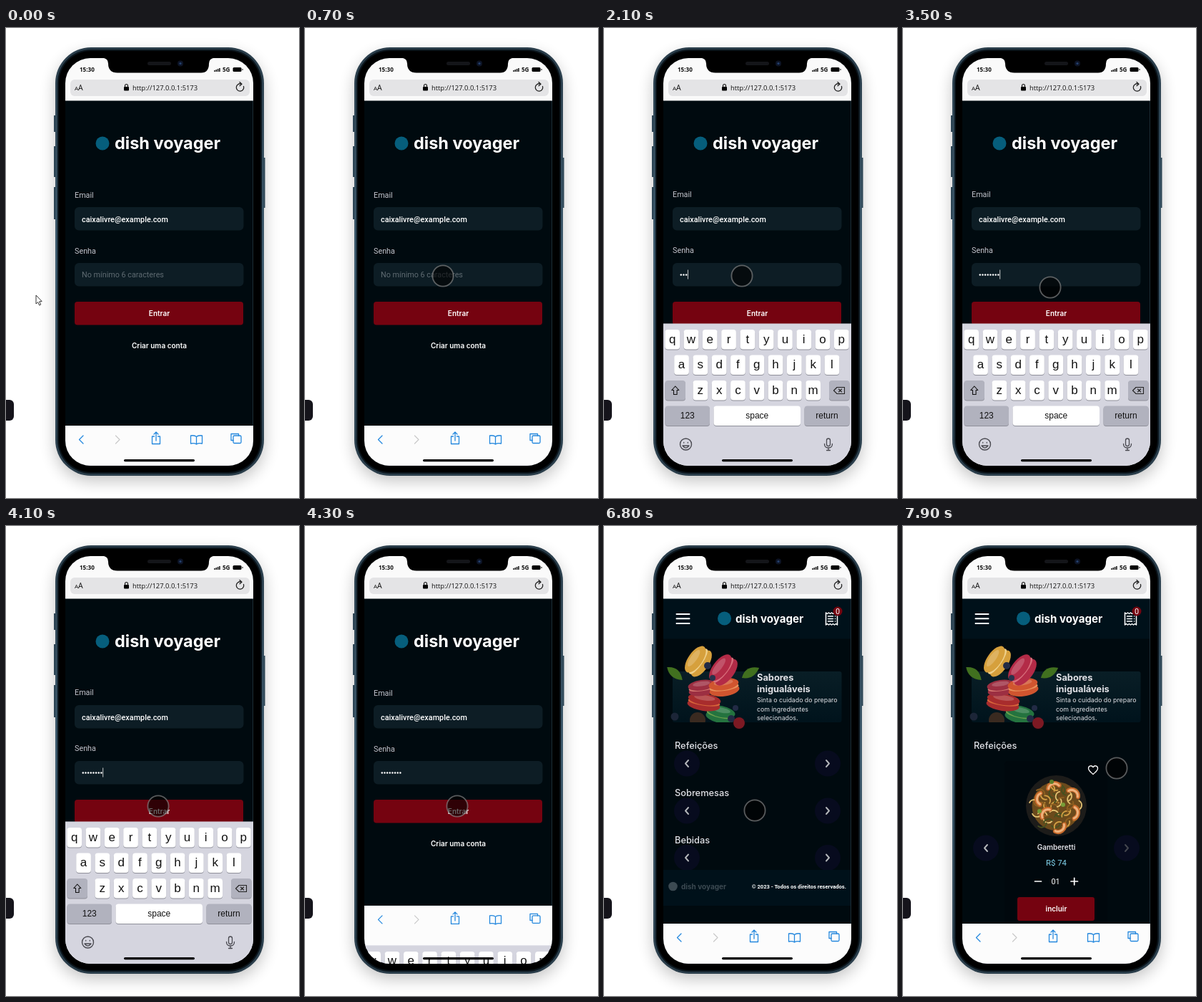
Animation, 410 px wide and 656 px high, one loop 8000 ms. Source, as an HTML page:

```html
<!DOCTYPE html>
<html lang="pt-BR">
<head>
<meta charset="utf-8">
<title>Login</title>
<style>
html, body { margin: 0; width: 100%; height: 100%; overflow: hidden; background: #fff }
svg { display: block; width: 100vw; height: 100vh }
text { font-family: Inter, sans-serif; fill: #fff }
.mid { text-anchor: middle }
.strong { font-size: 10px; font-weight: 600; text-anchor: middle }
.rob { font-family: Roboto, sans-serif; font-size: 10.8px }
.open { font-family: "Open Sans", sans-serif; fill: #111 }
.key text { font: 17px "Liberation Sans", Arial, sans-serif; fill: #111; text-anchor: middle }
.key .small { font-size: 12px }
.line { fill: none; stroke-width: 1.3; stroke-linecap: round; stroke-linejoin: round }
.brand { font-weight: 700 }
.head { font-size: 12.8px; font-weight: 500; fill: #e1e1e6 }
</style>
</head>
<body>
<svg viewBox="0 0 410 656">
  <defs>
    <filter id="soft" x="-20%" y="-20%" width="140%" height="140%"><feGaussianBlur stdDeviation="11"/></filter>
    <linearGradient id="steel" x2="0" y2="1">
      <stop stop-color="#2a3d4a"/><stop offset=".5" stop-color="#3d5a6d"/><stop offset="1" stop-color="#2a3d4a"/>
    </linearGradient>
    <linearGradient id="promo" x2="0" y2="1"><stop stop-color="#091e26"/><stop offset="1" stop-color="#00131c"/></linearGradient>
    <clipPath id="screen"><rect x="83" y="42" width="263" height="569" rx="35"/></clipPath>
    <clipPath id="art"><rect x="83" y="157" width="150" height="117"/></clipPath>
    <clipPath id="plate"><circle cx="214.500" cy="390.500" r="42.500"/></clipPath>
  </defs>

  <rect x="-10" y="519" width="21" height="29" rx="6" fill="#15141b"/>
  <rect x="69" y="36" width="292" height="596" rx="50" opacity=".24" filter="url(#soft)"/>
  <path d="M68.500 122v23M68.500 165v43M68.500 222v45M361 181v70" stroke="#2c4454" stroke-width="3"/>
  <rect x="69" y="27" width="292" height="598" rx="50" fill="url(#steel)"/>
  <rect x="72" y="30" width="286" height="592" rx="47" fill="#0b151c"/>
  <rect x="74" y="32" width="282" height="588" rx="45"/>

  <g clip-path="url(#screen)">
    <rect x="83" y="41" width="263" height="570" fill="#000a0f"/>
    <g id="login"></g>
    <g id="home"></g>
    <path d="M345.500 101v510" stroke="#26363f" stroke-width=".8"/>

    <rect x="83" y="41" width="263" height="60.500" fill="#fafafa"/>
    <rect x="90" y="72" width="251" height="23" rx="6" fill="#e4e4e6"/>
    <text class="open" x="103" y="60.500" font-size="8.100" font-weight="700">15:30</text>
    <text class="open" x="303" y="61" font-size="8.100" font-weight="700">5G</text>
    <path d="M292 61v-2M294.300 61v-3M296.600 61v-4M298.900 61v-5" stroke="#111" stroke-width="1.500"/>
    <rect x="317.500" y="55" width="12" height="6" rx="1.500"/><path d="M331 57v2" stroke="#111"/>
    <text class="open" x="96" y="87" font-size="8">A</text>
    <text class="open" x="101" y="87" font-size="10.500">A</text>
    <rect x="165" y="82" width="7" height="5.500" rx="1"/>
    <path d="M166.500 82v-1.500a2 2 0 0 1 4 0V82" fill="none" stroke="#111" stroke-width="1.100"/>
    <text class="open" x="177" y="87" font-size="9.400">http://127.0.0.1:5173</text>
    <path class="line" d="M332.500 81.500a5.200 5.200 0 1 1-3.500-3.500M327 75.500l3 2.700-3 2.500" stroke="#222"/>

    <g id="bar">
      <rect x="83" width="263" height="60" fill="#fcfcfc"/>
      <g class="line" stroke="#2387dd">
        <path d="M108 14l-5.500 5.500 5.500 5.500"/>
        <path d="M153.500 14l5.500 5.500-5.500 5.500" stroke="#ccc"/>
        <path d="M207.500 15h-3v10.500h11V15h-3M210 21V9.500M207 12l3-3 3 3"/>
        <path d="M266.500 15.500c-2-2-5-2-8-1.500v11c3-.5 6-.5 8 1c2-1.500 5-1.500 8-1V14c-3-.5-6-.5-8 1.500v10"/>
        <path d="M318 20.500h-3v-9h10.500V14"/><rect x="318" y="14" width="11" height="10.500" rx="1.500"/>
      </g>
    </g>
    <g id="keys" class="key"></g>
    <rect x="165" y="602" width="99" height="3.200" rx="1.600"/>
  </g>

  <path d="M135 41.500q8 1 8 8q0 13 13 13h117q11 0 11-13q0-7 8-8z"/>
  <rect x="198" y="47" width="33" height="5" rx="2.500" fill="#141519"/>
  <circle cx="244" cy="49.500" r="4" fill="#0d1426"/><circle cx="244" cy="49.500" r="1.600" fill="#24406e"/>

  <path id="arrow" d="M0 0v12l2.700-2.400 2 4.400 2-.9-2-4.300 3.500-.3z" fill="#fff" stroke="#222" stroke-width=".9"/>
  <circle id="touch" r="14.600" fill="#000" fill-opacity=".6" stroke="#888" stroke-opacity=".65" stroke-width="1.800"/>
</svg>
<script>
const $ = id => document.getElementById(id);
const BRAND = 'dish voyager', TEAL = '#065e7c', RED = '#750310';

const text = (x, y, s, attrs = '') => `<text x="${x}" y="${y}" ${attrs}>${s}</text>`;
const rect = (x, y, w, h, r, fill) => `<rect x="${x}" y="${y}" width="${w}" height="${h}" rx="${r}" fill="${fill}"/>`;
const dot = (x, y, r, fill) => `<circle cx="${x}" cy="${y}" r="${r}" fill="${fill}"/>`;
const oval = (y, rx, ry, fill) => `<ellipse cy="${y}" rx="${rx}" ry="${ry}" fill="${fill}"/>`;
const line = (d, color = '#fff', w = 1.3) => `<path class="line" d="${d}" stroke="${color}" style="stroke-width:${w}"/>`;

// Login page
$('login').innerHTML =
  dot(135, 161, 9.5, TEAL) + text(152, 169, BRAND, 'class="brand" font-size="23.5"') +
  `<g id="labels">${text(96, 237, 'Email', 'class="rob" style="fill:#c4c4cc"')}
   ${text(96, 315, 'Senha', 'class="rob" style="fill:#c4c4cc"')}</g>` +
  rect(96, 250, 236.5, 32.5, 6, '#0d1d25') + rect(96, 328, 236.5, 32.5, 6, '#0d1d25') +
  text(106, 271, 'caixalivre@example.com', 'class="rob" font-weight="500"') +
  text(106, 348, 'No mínimo 6 caracteres', 'id="hint" class="rob" style="fill:#5f6b72"') +
  `<g id="dots">${Array.from({ length: 8 }, (_, i) => dot(107.8 + 3.65 * i, 344.5, 1.25, '#fff')).join('')}</g>` +
  '<path id="caret" d="M106.500 337.500v13" stroke="#ddd" stroke-width=".9"/>' +
  rect(96, 382, 236, 32.5, 4, RED) +
  text(214.5, 401.5, 'Entrar', 'class="strong"') +
  text(214.5, 446.5, 'Criar uma conta', 'class="strong"');

// Home page
const macaron = (x, y, w, h, turn, shell, cream) =>
  `<g transform="translate(${x} ${y}) rotate(${turn})">` +
  oval(h * .17, w / 2, h * .33, shell) + oval(0, w * .49, h * .2, cream) +
  oval(-h * .17, w / 2, h * .33, shell) + oval(-h * .26, w * .32, h * .15, '#ffffff30') + '</g>';
const leaf = (x, y, turn) =>
  `<path transform="translate(${x} ${y}) rotate(${turn})" d="M-14 0q13-13 28 0q-15 11-28 0" fill="#41701f"/>`;
const chevron = (x, y, s, color) =>
  dot(x, y, 18, '#070b1e') + line(`M${x - 2 * s} ${y - 4.5}l${4 * s} 4.500l${-4 * s} 4.500`, color, 1.9);
const arrows = (y, right = '#b5b8bb') => chevron(116, y, -1, '#b5b8bb') + chevron(313, y, 1, right);
const arc = (x, y, r, turn, color, w) =>
  `<path transform="translate(${x} ${y}) rotate(${turn})" d="M${-r} 0a${r} ${r} 0 0 1 ${1.6 * r} ${-.8 * r}"
   fill="none" stroke="${color}" stroke-width="${w}" stroke-linecap="round"/>`;

const banner =
  rect(96, 203, 236.5, 71, 3, 'url(#promo)') +
  '<g clip-path="url(#art)">' + leaf(99, 206, 40) + leaf(205, 205, -30) +
  dot(131, 271, 11, '#3a2a20') + dot(99, 266, 5.5, '#1c2537') +
  macaron(163, 263, 40, 24, 12, '#24733f', '#6ea04c') +
  macaron(140, 246, 46, 24, 8, '#a82c2d', '#d7653a') +
  macaron(137, 226, 38, 22, -8, '#9c2f42', '#d77a72') +
  macaron(168, 225, 42, 25, -8, '#d0552f', '#e9925b') +
  macaron(167, 201, 44, 31, -52, '#b32b47', '#d86f7c') +
  macaron(132, 189, 43, 30, -55, '#d6a03c', '#efd08a') +
  dot(145, 195, 5, '#222b45') + dot(152, 212, 4, '#29324b') + dot(184, 254, 4, '#222b45') + dot(178, 269, 5, '#222b45') +
  '</g>' + dot(189, 275, 8, '#7d1923') +
  ['Sabores', 'inigualáveis'].map((s, i) =>
    text(214, 216 + 16.3 * i, s, 'font-size="12.8" font-weight="700" style="fill:#e1e1e6"')).join('') +
  ['Sinta o cuidado do preparo', 'com ingredientes', 'selecionados.'].map((s, i) =>
    text(214, 246 + 12.5 * i, s, 'font-size="8.8" style="fill:#e1e1e6"')).join('');

const header =
  rect(83, 101, 263, 56.5, 0, '#00111a') + line('M101.500 123h18M101.500 129.300h18M101.500 136h18', '#fff', 2) +
  dot(168.5, 129, 9.5, TEAL) + text(184, 134.5, BRAND, 'class="brand" font-size="15.1"') +
  line('M310.500 121v17l2-1.500 2 1.500 2-1.500 2 1.500 2-1.500 2 1.500 2-1.500 2 1.500v-17l-2 1.500-2-1.500-2 1.500-2-1.500-2 1.500-2-1.500-2 1.500z' +
    'M313.500 126h7M313.500 129.500h7M313.500 133h7M323.500 126h.1M323.500 129.500h.1M323.500 133h.1', '#fff', 1.5) +
  dot(327, 119, 6.5, RED) + text(327, 123, '0', 'class="rob mid"');

const empty =
  [331.5, 397.5, 463].map(y => arrows(y)).join('') +
  ['Sobremesas', 'Bebidas'].map((s, i) => text(99, 377 + 66 * i, s, 'class="head"')).join('') +
  rect(83, 480, 263, 50, 0, '#00111a') + dot(96.5, 503, 6.3, '#3c4a52') +
  text(108, 507, BRAND, 'class="brand" font-size="10" style="fill:#3c4a52"') +
  text(339, 506, '© 2023 - Todos os direitos reservados.', 'text-anchor="end" class="rob" style="font-size:7.6px" font-weight="700"');

const noodles = Array.from({ length: 40 }, (_, i) => {
  const a = i * 2.4, d = 5 * Math.sqrt(i);
  return arc(214 + d * Math.cos(a), 392 + d * Math.sin(a), 7, i * 67, ['#d3a044', '#8f5f20', '#e4c272', '#46501f'][i % 4], 1.8);
}).join('');
const prawns = [[196, 381, -60], [212, 368, 10], [236, 377, 60], [236, 400, 120], [203, 404, -20], [217, 418, 170]]
  .map(([x, y, turn]) => arc(x, y, 9, turn, '#c96a2b', 6) + arc(x, y, 8.5, turn, '#eeb27c', 3)).join('');
const card =
  rect(142, 328, 144, 240, 5, '#00080d') +
  line('M266 346.500c-3-2.800-6.500-5-6.500-8.300c0-3.800 4.700-4.700 6.500-1.400c1.800-3.300 6.500-2.400 6.500 1.400c0 3.300-3.500 5.500-6.500 8.300z') +
  '<g clip-path="url(#plate)">' + dot(214.5, 390.5, 43, '#1d1c1a') + dot(214.5, 391, 34, '#6b4a1c') + noodles + prawns +
  dot(191, 398, 3, '#6f9b34') + dot(224, 389, 3, '#789f39') + dot(208, 357, 3, '#587e2a') + '</g>' +
  text(214.5, 452, 'Gamberetti', 'class="mid" font-size="10" font-weight="600" style="fill:#e1e1e6"') +
  text(214.5, 474, 'R$ 74', 'class="rob mid" style="fill:#82d5ee;font-size:11.4px"') +
  line('M184.500 496h9M235 496h9.500M239.700 491.300v9.500', '#fff', 1.7) +
  text(213.5, 500, '01', 'class="rob mid"') + rect(160, 518, 108, 33, 3, RED) +
  text(214.5, 538, 'incluir', 'class="strong"') + arrows(449.5, '#45484f');

$('home').innerHTML = header + banner +
  `<g id="empty">${empty}</g><g id="card">${card}</g>` + text(99, 311, 'Refeições', 'class="head"');

// Keyboard, drawn from its own top edge
const key = (x, y, w, label, fill = '#fff', cls = '') =>
  rect(x, y + 1, w, 27.5, 4, '#8f909a') + rect(x, y, w, 27.5, 4, fill) +
  (label && text(x + w / 2, y + (cls ? 17 : 18.5), label, `class="${cls}"`));
const GREY = '#b1b2be';
$('keys').innerHTML = rect(83, -.5, 263, 200, 0, '#d5d5df') +
  [['qwertyuiop', 85.3, 8], ['asdfghjkl', 98.2, 43.5], ['zxcvbnm', 124.5, 79]].map(([row, x, y]) =>
    [...row].map((c, i) => key(x + 26.3 * i, y, 20.7, c)).join('')).join('') +
  key(85.5, 79, 28.5, '', GREY) + key(315, 79, 28.5, '', GREY) +
  line('M99.800 87l-5 5.500h2.700v6h4.600v-6h2.700z', '#111', 1.1) +
  line('M326 88.500h10.500v9H326l-4.500-4.500zM328.500 91l4 4M332.500 91l-4 4', '#222', 1.1) +
  key(85.5, 114.5, 62.5, '123', GREY, 'small') + key(153.500, 114.5, 121.5, 'space', '#fff', 'small') +
  key(280.5, 114.5, 63, 'return', GREY, 'small') +
  line('M122.500 168a8 8 0 1 1-16 0a8 8 0 1 1 16 0zM110 170q4.500 6 9 0zM111.700 165.500v.5M117.300 165.500v.5', '#4b4b52', 1.4) +
  '<rect class="line" x="311.500" y="160" width="5" height="10.500" rx="2.500" stroke="#4b4b52"/>' +
  line('M308.500 167.500q0 5.500 5.500 5.500t5.500-5.500M314 173v3.500M311.500 176.500h5', '#4b4b52');

// Timing
const LOOP = 8000, STEP = 100;
const OPEN_Y = 413, SHUT_Y = 611, PAGE_END = 555;
const typed = [1500, 1700, 2100, 2400, 2600, 2900, 3000, 3200];
const path = [[0, 42, 373], [700, 193, 346], [3300, 193, 346], [3500, 206, 362], [4000, 213, 391],
  [6400, 213, 391], [6800, 211, 397], [7200, 211, 397], [7900, 299, 338]];

const clamp = u => Math.min(1, Math.max(0, u));
const easeOut = (u, power) => 1 - (1 - clamp(u)) ** power;
const show = (id, on) => $(id).style.display = on ? '' : 'none';
const move = (id, x, y) => $(id).setAttribute('transform', `translate(${x} ${y})`);

function pointer(t) {
  const i = Math.max(1, path.findIndex(p => p[0] >= t));
  const [t0, x0, y0] = path[i - 1], [t1, x1, y1] = path[i];
  const u = clamp((t - t0) / (t1 - t0)), s = u * u * (3 - 2 * u);
  return [x0 + (x1 - x0) * s, y0 + (y1 - y0) * s];
}

function draw(t) {
  const closing = t > 4100, home = t >= 6400, loaded = t >= 7000;
  const count = typed.filter(k => k <= t).length;
  const focus = t >= 1000 && !closing;
  const up = closing ? 1 - easeOut((t - 4100) / 300, 1.88) : easeOut((t - 900) / 400, 2.36);
  const keyY = SHUT_Y + (OPEN_Y - SHUT_Y) * up;

  move('keys', 0, keyY);
  move('bar', 0, closing ? keyY - SHUT_Y + PAGE_END : PAGE_END);
  move('labels', 0, up > .9 ? -1 : 0);
  show('hint', !count);
  [...$('dots').children].forEach((d, i) => d.style.display = i < count ? '' : 'none');
  show('caret', focus);
  move('caret', 3.65 * count, 0);

  show('login', !home);
  show('home', home);
  show('empty', !loaded);
  show('card', loaded);

  const [x, y] = pointer(t), inside = x > 83;
  show('arrow', !inside);
  show('touch', inside);
  move('arrow', x, y);
  move('touch', x, y);
}

let start;
function tick(now) {
  start ??= now;
  draw(Math.floor((now - start) % LOOP / STEP) * STEP);
  requestAnimationFrame(tick);
}
draw(0);
requestAnimationFrame(tick);
</script>
</body>
</html>
```
